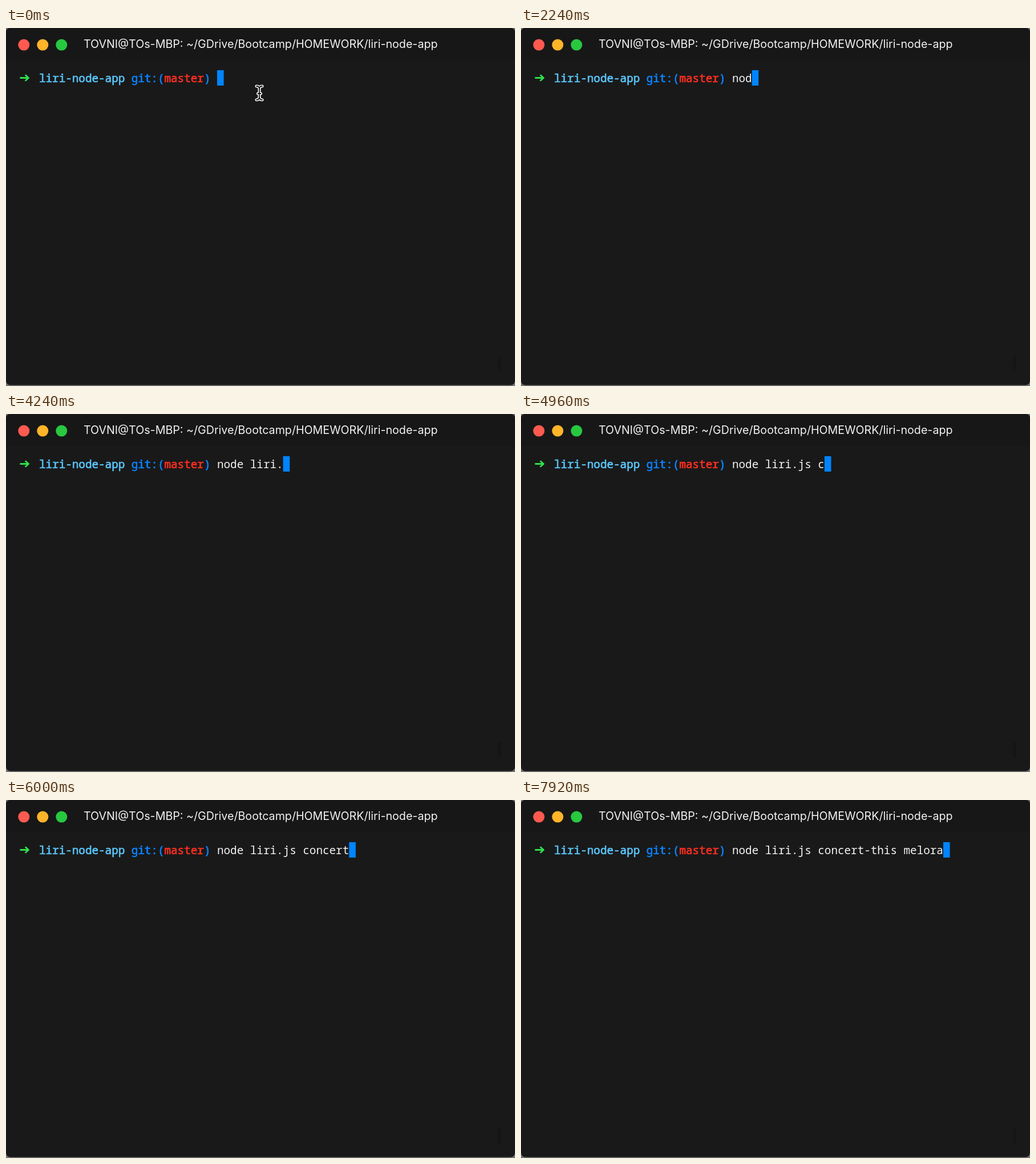
Animation of 892x628 px, one loop 8000 ms. Source, as an HTML page:

```html
<!DOCTYPE html>
<html lang="en">
<head>
<meta charset="utf-8">
<title>Terminal typing</title>
<style>
  html, body { margin: 0; width: 100%; height: 100%; overflow: hidden; background: #191919; }
  svg { display: block; width: 892px; height: 628px; }
  text { white-space: pre; }
  .title { font: 19.67px Inter, sans-serif; fill: #f2f2f2; text-anchor: end; }
  .mono { font: 19.27px "Noto Sans Mono", monospace; fill: #f4f4f4; }
  .prompt { fill: var(--tint); stroke: var(--tint); stroke-width: 0.7; }
  .dir { --tint: #5ac6fa; }
  .git { --tint: #0a84ff; }
  .branch { --tint: #ff2f21; }
  .line { fill: none; stroke-linecap: round; stroke-linejoin: round; }
</style>
</head>
<body>
<svg viewBox="0 0 892 628">
  <defs>
    <path id="beam" class="line" d="M439 102Q444 102 444 107V121Q444 126 439 126M449 102Q444 102 444 107M444 121Q444 126 449 126M441.5 115H446.5"/>
  </defs>
  <rect width="892" height="628" fill="#707070"/>
  <rect width="892" height="626.5" rx="8" fill="#191919"/>
  <path d="M0 56V8Q0 0 8 0H884Q892 0 892 8V56Z" fill="#171717"/>
  <rect x="862" y="576" width="6" height="26" rx="3" fill="#151515"/>

  <circle cx="31.3" cy="29.6" r="10" fill="#ff5a50"/>
  <circle cx="64.3" cy="29.6" r="10" fill="#ffb429"/>
  <circle cx="97.3" cy="29.6" r="10" fill="#28c840"/>
  <text class="title" x="756.5" y="35">TOVNI@TOs-MBP: ~/GDrive/Bootcamp/HOMEWORK/liri-node-app</text>

  <path class="line" d="M25.5 87.5H38M34.5 83L39.5 87.5L34.5 92" stroke="#30e04b" stroke-width="2.8"/>
  <text class="mono prompt dir" x="58" y="95">liri-node-app</text>
  <text class="mono prompt git" x="219.7" y="95">git:(</text>
  <text class="mono prompt branch" x="277.5" y="95">master</text>
  <text class="mono prompt git" x="346.9" y="95">)</text>
  <text class="mono" id="typed" x="370" y="95"></text>
  <rect id="caret" y="74" width="11.6" height="27" fill="#0084ff"/>

  <g id="pointer">
    <use href="#beam" stroke="#fff" stroke-width="5"/>
    <use href="#beam" stroke="#151515" stroke-width="1.8"/>
  </g>
</svg>
<script>
  const LOOP = 8000, INPUT_X = 370, CHAR_WIDTH = 11.562;
  const command = "node liri.js concert-this melora";
  // Time in ms at which each character of the command appears.
  const keyTimes = [
    1840, 2080, 2240, 2400, 2560,
    2720, 2960, 3120, 3760, 3920, 4480, 4640, 4800,
    4960, 5120, 5200, 5360, 5440, 5600, 5760,
    6240, 6480, 6640, 6720, 6800, 6960,
    7120, 7280, 7440, 7600, 7760, 7920
  ];
  const typed = document.getElementById("typed");
  const caret = document.getElementById("caret");
  const pointer = document.getElementById("pointer");
  const start = performance.now();

  function draw() {
    const time = (performance.now() - start) % LOOP;
    const count = keyTimes.filter(key => key <= time).length;
    typed.textContent = command.slice(0, count);
    caret.setAttribute("x", INPUT_X + count * CHAR_WIDTH);
    pointer.style.visibility = count ? "hidden" : "visible";
    requestAnimationFrame(draw);
  }
  draw();
</script>
</body>
</html>
```
